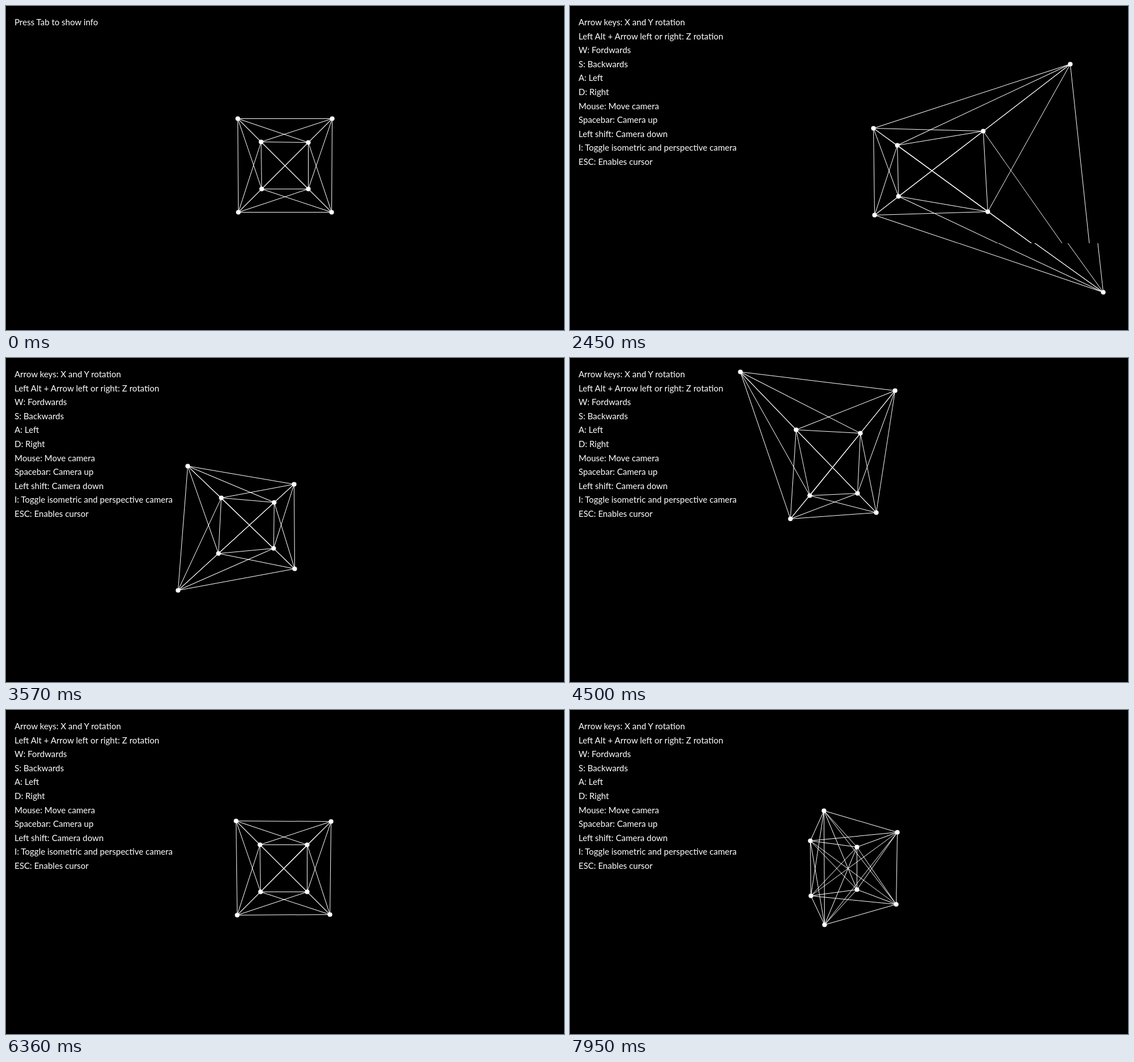
Animation, 981 px wide and 571 px high, one loop 8 s. Source, as an HTML page without scripts:

```html
<!DOCTYPE html>
<html lang="en">
<head>
<meta charset="utf-8">
<title>Wireframe cube</title>
<style>
@property --yaw { syntax: "<angle>"; inherits: true; initial-value: 0deg; }
@property --pitch { syntax: "<angle>"; inherits: true; initial-value: 0deg; }
@property --spin { syntax: "<angle>"; inherits: true; initial-value: 0deg; }
@property --tear { syntax: "<angle>"; inherits: true; initial-value: 0deg; }

html, body { margin: 0; width: 100%; height: 100%; overflow: hidden; background: #000; }
svg { display: block; animation: look 8s infinite, spin 8s infinite; }
text { font: 400 15px Lato, "Open Sans", sans-serif; fill: #fff; }
.hint { animation: hint 8s step-end infinite; }
.keys { animation: keys 8s step-end infinite; }
.lower { animation: tear 8s step-end infinite; }

/* Corner = column (odd multiple of 45deg) and height (-1 top, 1 bottom).
   --a, --e: first corner; --b, --f: second corner. */
path, circle {
  --turn: calc(var(--yaw) + var(--tear));
  --cy: cos(var(--turn));
  --sy: sin(var(--turn));
  --cp: cos(var(--pitch));
  --sp: sin(var(--pitch));

  --au: calc(1.41421 * sin(var(--spin) + var(--a) * 45deg));
  --aw: calc(3 - 1.41421 * cos(var(--spin) + var(--a) * 45deg));
  --az: calc(var(--aw) * var(--cy) - var(--au) * var(--sy));
  --ad: calc(var(--az) * var(--cp) + var(--e) * var(--sp));
  --ax: calc(490.6 + 164.8 * (var(--au) * var(--cy) + var(--aw) * var(--sy)) / var(--ad));
  --ay: calc(283.2 + 164.8 * (var(--e) * var(--cp) - var(--az) * var(--sp)) / var(--ad));
  --x1: var(--ax);
  --y1: var(--ay);
}
path {
  --bu: calc(1.41421 * sin(var(--spin) + var(--b) * 45deg));
  --bw: calc(3 - 1.41421 * cos(var(--spin) + var(--b) * 45deg));
  --bz: calc(var(--bw) * var(--cy) - var(--bu) * var(--sy));
  --bd: calc(var(--bz) * var(--cp) + var(--f) * var(--sp));
  --bx: calc(490.6 + 164.8 * (var(--bu) * var(--cy) + var(--bw) * var(--sy)) / var(--bd));
  --by: calc(283.2 + 164.8 * (var(--f) * var(--cp) - var(--bz) * var(--sp)) / var(--bd));
  --x2: var(--bx);
  --y2: var(--by);

  --dx: calc(var(--x2) - var(--x1));
  --dy: calc(var(--y2) - var(--y1));
  --len: hypot(var(--dx), var(--dy));
  fill: none;
  stroke: #fff;
  /* one pixel along the minor axis */
  stroke-width: calc(1px * max(var(--dx), -1 * var(--dx), var(--dy), -1 * var(--dy)) / var(--len));
  shape-rendering: crispEdges;
  transform: translate(calc(var(--x1) * 1px), calc(var(--y1) * 1px))
    rotate(atan2(var(--dy), var(--dx))) scale(var(--len), 1);
}
circle {
  fill: #fff;
  transform: translate(calc(var(--x1) * 1px), calc(var(--y1) * 1px));
}
/* snap corners to pixel centres */
@supports (width: round(down, 1.5px, 1px)) {
  path, circle {
    --x1: calc(round(down, var(--ax), 1) + .5);
    --y1: calc(round(down, var(--ay), 1) + .5);
  }
  path {
    --x2: calc(round(down, var(--bx), 1) + .5);
    --y2: calc(round(down, var(--by), 1) + .5);
  }
}

@keyframes look {
  0% { --yaw: -.1deg; --pitch: .65deg; animation-timing-function: step-end; }
  21.625% { --yaw: -.1deg; --pitch: .65deg; animation-timing-function: steps(3, start); }
  24.11% { --yaw: 9deg; --pitch: 0deg; animation-timing-function: steps(3, start); }
  26.6% { --yaw: 33deg; --pitch: -1.7deg; animation-timing-function: steps(3, start); }
  29.08% { --yaw: 43deg; --pitch: -2.4deg; animation-timing-function: step-end; }
  30.625% { --yaw: 41.45deg; --pitch: -2.45deg; animation-timing-function: step-end; }
  31.5% { --yaw: 41.45deg; --pitch: -2.45deg; animation-timing-function: steps(4, start); }
  34.75% { --yaw: 22deg; --pitch: -2.5deg; animation-timing-function: steps(4, start); }
  38% { --yaw: -11deg; --pitch: -2.7deg; animation-timing-function: steps(4, start); }
  41.25% { --yaw: -32.3deg; --pitch: -2.9deg; animation-timing-function: step-start; }
  43% { --yaw: -33.8deg; --pitch: -2.9deg; animation-timing-function: steps(3, start); }
  45.4% { --yaw: -20.75deg; --pitch: -3.95deg; animation-timing-function: step-end; }
  45.5% { --yaw: -20.75deg; --pitch: -3.95deg; animation-timing-function: steps(5, start); }
  49.56% { --yaw: -14.3deg; --pitch: 6.2deg; animation-timing-function: step-end; }
  50.5% { --yaw: -14.3deg; --pitch: 6.2deg; animation-timing-function: steps(4, start); }
  53.79% { --yaw: -12deg; --pitch: 17.5deg; animation-timing-function: steps(4, start); }
  57.07% { --yaw: -8.85deg; --pitch: 28.75deg; animation-timing-function: step-start; }
  59.75% { --yaw: -8.8deg; --pitch: 29.3deg; animation-timing-function: step-start; }
  60.5% { --yaw: -8.4deg; --pitch: 26.3deg; animation-timing-function: step-start; }
  61.25% { --yaw: -8deg; --pitch: 21.6deg; animation-timing-function: steps(9, start); }
  68.75% { --yaw: -6.7deg; --pitch: -16.2deg; animation-timing-function: steps(4, start); }
  72% { --yaw: -4.2deg; --pitch: -11.2deg; animation-timing-function: steps(4, start); }
  75.72% { --yaw: -1.8deg; --pitch: -3.1deg; animation-timing-function: steps(5, start); }
  80.4%, 100% { --yaw: -.7deg; --pitch: 1.35deg; }
}
@keyframes spin {
  0%, 88.625% { --spin: 0deg; animation-timing-function: steps(7, start); }
  94.46% { --spin: -80deg; animation-timing-function: step-end; }
  98.625% { --spin: -80deg; animation-timing-function: steps(2, start); }
  100% { --spin: -62deg; }
}
@keyframes tear {
  0%, 31.5%, 100% { --tear: 0deg; }
  30.625% { --tear: .7deg; }
}
@keyframes hint {
  0% { visibility: visible; }
  12.5%, 100% { visibility: hidden; }
}
@keyframes keys {
  0% { visibility: hidden; }
  12.5%, 100% { visibility: visible; }
}
</style>
</head>
<body>
<svg width="981" height="571" viewBox="0 0 981 571">
  <defs>
    <clipPath id="above"><rect width="981" height="418"/></clipPath>
    <clipPath id="below"><rect y="418" width="981" height="153"/></clipPath>

    <!-- all links between two columns -->
    <g id="links">
      <path d="M0 0H1" style="--e:-1;--f:-1"/>
      <path d="M0 0H1" style="--e:-1;--f:1"/>
      <path d="M0 0H1" style="--e:1;--f:-1"/>
      <path d="M0 0H1" style="--e:1;--f:1"/>
    </g>
    <!-- one column with its two corners -->
    <g id="post">
      <path d="M0 0H1" style="--e:-1;--f:1"/>
      <circle r="4.1" style="--e:-1"/>
      <circle r="4.1" style="--e:1"/>
    </g>
    <g id="cube">
      <use href="#links" style="--a:-1;--b:1"/>
      <use href="#links" style="--a:-1;--b:3"/>
      <use href="#links" style="--a:-1;--b:5"/>
      <use href="#links" style="--a:1;--b:3"/>
      <use href="#links" style="--a:1;--b:5"/>
      <use href="#links" style="--a:3;--b:5"/>
      <use href="#post" style="--a:-1;--b:-1"/>
      <use href="#post" style="--a:1;--b:1"/>
      <use href="#post" style="--a:3;--b:3"/>
      <use href="#post" style="--a:5;--b:5"/>
    </g>
  </defs>

  <g clip-path="url(#above)"><use href="#cube"/></g>
  <g clip-path="url(#below)" class="lower"><use href="#cube"/></g>

  <text class="hint" x="15" y="34">Press Tab to show info</text>
  <text class="keys" y="34">
    <tspan x="15">Arrow keys: X and Y rotation</tspan>
    <tspan x="15" dy="24.6">Left Alt + Arrow left or right: Z rotation</tspan>
    <tspan x="15" dy="24.6">W: Fordwards</tspan>
    <tspan x="15" dy="24.6">S: Backwards</tspan>
    <tspan x="15" dy="24.6">A: Left</tspan>
    <tspan x="15" dy="24.6">D: Right</tspan>
    <tspan x="15" dy="24.6">Mouse: Move camera</tspan>
    <tspan x="15" dy="24.6">Spacebar: Camera up</tspan>
    <tspan x="15" dy="24.6">Left shift: Camera down</tspan>
    <tspan x="15" dy="24.6">I: Toggle isometric and perspective camera</tspan>
    <tspan x="15" dy="24.6">ESC: Enables cursor</tspan>
  </text>
</svg>
</body>
</html>
```
